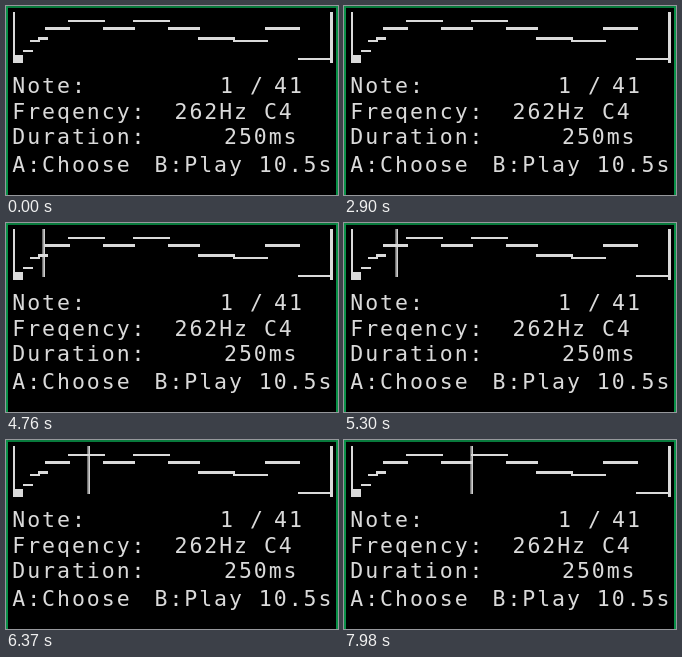
An HTML page for the animation above (8 s loop, 332 px wide and 189 px high).

```html
<!DOCTYPE html>
<html lang="en">
<head>
<meta charset="utf-8">
<title>Tune editor</title>
<style>
  html, body { margin: 0; width: 100%; height: 100%; overflow: hidden; background: #000; }
  svg { display: block; width: 100vw; height: 100vh; }
  text {
    font: 21.5px "DejaVu Sans Mono", "Liberation Mono", monospace;
    letter-spacing: 1.96px; fill: #dadada; white-space: pre;
  }
  .case { fill: none; stroke: #0a9048; stroke-width: 2; }
  .top { stroke: #087a3c; }
  .ink { fill: #dadada; }
  .notes { fill: none; stroke: #dadada; stroke-width: 2; }
  .thick { stroke-width: 3; }

  /* The playhead advances one display pixel (2.5 units) per step. */
  #playhead { animation: sweep 8s infinite, show 8s step-end infinite; }
  @keyframes show {
    0% { opacity: 0; }
    46.125%, 100% { opacity: 1; }
  }
  @keyframes sweep {
    0%, 46.125% { transform: translateX(0); animation-timing-function: steps(1, end); }
    48.375% { transform: translateX(2.5px); animation-timing-function: steps(4, end); }
    52.5% { transform: translateX(12.5px); animation-timing-function: steps(5, end); }
    58.25% { transform: translateX(25px); animation-timing-function: steps(1, end); }
    59.5% { transform: translateX(27.5px); animation-timing-function: steps(6, end); }
    66.25% { transform: translateX(42.5px); animation-timing-function: steps(3, end); }
    69.125% { transform: translateX(50px); animation-timing-function: steps(1, end); }
    70.375% { transform: translateX(52.5px); animation-timing-function: steps(8, end); }
    79.625% { transform: translateX(72.5px); animation-timing-function: steps(1, end); }
    80.875% { transform: translateX(75px); animation-timing-function: steps(7, end); }
    88.25% { transform: translateX(92.5px); animation-timing-function: steps(2, end); }
    90.5% { transform: translateX(97.5px); animation-timing-function: steps(1, end); }
    91.75% { transform: translateX(100px); animation-timing-function: steps(7, end); }
    99.75%, 100% { transform: translateX(117.5px); }
  }
</style>
</head>
<body>
<svg viewBox="0 0 332 189" preserveAspectRatio="none">
  <rect width="332" height="189"/>
  <path class="case top" d="M0 1H332"/>
  <path class="case" d="M1 0V189M331 0V189"/>

  <g class="ink">
    <rect x="7" y="6" width="2" height="48"/>
    <rect x="324" y="6" width="3" height="51"/>
    <rect x="7" y="49" width="10" height="8"/>
    <rect id="playhead" x="9.5" y="6" width="2.4" height="48"/>
  </g>
  <path class="notes" d="M17 45H27M24 35H34M62 15H99M127 15H164M227 35H262M292 53H326"/>
  <path class="notes thick" d="M32 32.5H42M39 22.5H64M97 22.5H129M162 22.5H194
    M192 32.5H229M259 22.5H294"/>

  <text x="6.3" y="87">Note:</text>
  <text x="214" y="87">1</text>
  <text x="244" y="87">/</text>
  <text x="268" y="87">41</text>
  <text x="6.3" y="113">Freqency:</text>
  <text x="168.5" y="113">262Hz C4</text>
  <text x="6.3" y="138">Duration:</text>
  <text x="218" y="138">250ms</text>
  <text x="6.3" y="166">A:Choose</text>
  <text x="148.5" y="166">B:Play 10.5s</text>
</svg>
</body>
</html>
```
